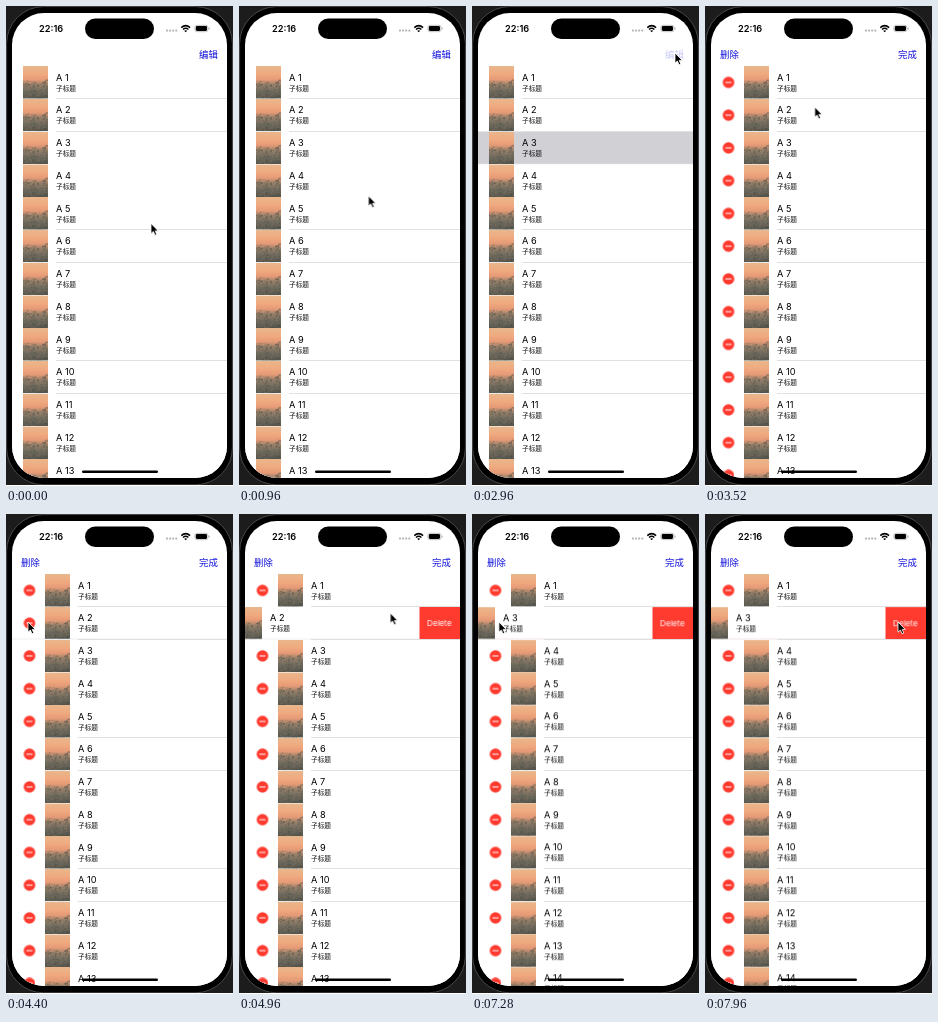
Write an HTML page that moves like this. It is 227x480 px and loops after 8 s.

```html
<!DOCTYPE html>
<html lang="zh">
<head>
<meta charset="utf-8">
<title>List editing</title>
<style>
  html, body { margin: 0; width: 100%; height: 100%; overflow: hidden; background: #1c1c1d; }
  svg { display: block; width: 100vw; height: 100vh; }
  text { font-family: Inter, "Noto Sans CJK SC", "Noto Sans CJK", sans-serif; }
  .bar { font-size: 9.4px; fill: #1010dc; }
  .title { font-size: 9.2px; fill: #000; }
  .sub { font-size: 6.7px; fill: #111; }
  .del { font-size: 8.1px; fill: #fff; }
</style>
</head>
<body>
<svg viewBox="0 0 227 480">
  <defs>
    <linearGradient id="dusk" x1="0" y1="0" x2="0" y2="1">
      <stop offset="0" stop-color="#e9b78c"/>
      <stop offset=".25" stop-color="#f0a97f"/>
      <stop offset=".42" stop-color="#e59a76"/>
      <stop offset=".58" stop-color="#96806a"/>
      <stop offset=".78" stop-color="#6c695d"/>
      <stop offset="1" stop-color="#53544d"/>
    </linearGradient>
    <clipPath id="photoClip"><rect width="25" height="32.8"/></clipPath>
    <clipPath id="screenClip"><rect x="6" y="7" width="215" height="465" rx="32"/></clipPath>
    <g id="photo" clip-path="url(#photoClip)">
      <rect width="25" height="32.8" fill="url(#dusk)"/>
      <g id="trees"/>
    </g>
    <g id="minus">
      <circle r="5.8" fill="#ff3b30"/>
      <rect x="-3" y="-.5" width="6" height="1" fill="#fff"/>
    </g>
  </defs>

  <rect x=".6" y=".6" width="225.8" height="478.2" rx="37" fill="#000" stroke="#48484a" stroke-width="1"/>
  <rect y="479" width="227" height="1" fill="#fff"/>

  <g clip-path="url(#screenClip)">
    <rect x="6" y="7" width="215" height="465" fill="#fff"/>
    <g id="rows"/>
    <g id="lines" fill="#e0e0e2"/>
    <text id="remove" class="bar" x="15" y="51.7">删除</text>
    <text id="edit" class="bar" x="193" y="51.7">编辑</text>
    <text id="done" class="bar" x="193" y="51.7">完成</text>

    <text x="33" y="25.9" font-size="9.2" font-weight="600">22:16</text>
    <g fill="#b4b4b6">
      <rect x="160" y="23.6" width="2" height="2" rx=".7"/>
      <rect x="163.1" y="23.6" width="2" height="2" rx=".7"/>
      <rect x="166.2" y="23.6" width="2" height="2" rx=".7"/>
      <rect x="169.3" y="23.6" width="2" height="2" rx=".7"/>
    </g>
    <g fill="none" stroke="#000" stroke-width="1.5">
      <path d="M175.3 21.6Q179.7 17.6 184.1 21.6"/>
      <path d="M177 23.5Q179.7 21.1 182.4 23.5"/>
    </g>
    <path d="M178.2 24.7Q179.7 23.6 181.2 24.7L179.7 26.3Z"/>
    <rect x="188.9" y="19.3" width="13" height="6.4" rx="2" fill="none" stroke="#999" stroke-width=".6"/>
    <rect x="189.8" y="20.1" width="11.2" height="4.8" rx="1.3"/>
    <rect x="202.6" y="21.4" width=".9" height="2.2" rx=".4" fill="#999"/>
    <rect x="76" y="464.4" width="76" height="2.7" rx="1.35"/>
  </g>
  <rect x="79" y="12.6" width="69" height="20.4" rx="10.2"/>

  <g id="cursor">
    <path d="M0 0V10.2L2.4 8 4 11.8 5.8 11 4.2 7.4H7.3Z" fill="#000" stroke="#fff" stroke-width=".8" stroke-linejoin="round"/>
  </g>
</svg>
<script>
const LOOP = 8000, ROW = 32.75, TOP = 60;
const $ = id => document.getElementById(id);
const EASE = 'cubic-bezier(.25,.1,.25,1)';

// Steps are [ms, value, easing]; the first and last values are held.
function play(el, prop, steps) {
  const frames = steps.map(([ms, value, easing = 'linear']) =>
    ({ offset: ms / LOOP, [prop]: value, easing }));
  frames.unshift({ ...frames[0], offset: 0, easing: 'linear' });
  frames.push({ ...frames[frames.length - 1], offset: 1 });
  el.animate(frames, { duration: LOOP, iterations: Infinity });
}
const move = (el, steps) => play(el, 'transform',
  steps.map(([ms, x, y, easing]) => [ms, `translate(${x}px,${y}px)`, easing]));
const fade = (el, steps) => play(el, 'opacity', steps);

// Fine twigs that rise towards both sides of the photo
let seed = 7;
const rnd = () => (seed = seed * 16807 % 2147483647) / 2147483647;
const tones = ['#55544a', '#6f6656', '#857460', '#4c4e46'];
let trees = '';
for (let i = 0; i < 130; i++) {
  const x = rnd() * 25, y = 17 - Math.abs(x - 13) * .3 + rnd() * 18;
  trees += `<circle cx="${x.toFixed(1)}" cy="${y.toFixed(1)}" r="${(.4 + rnd() * .7).toFixed(1)}" fill="${tones[i % 4]}" opacity=".5"/>`;
}
$('trees').innerHTML = trees;

// Hairlines survive only where they meet the pixel grid: two of every four
for (let i = 1; i < 12; i++) {
  if (i % 4 === 1 || i % 4 === 2) {
    $('lines').innerHTML += `<rect x="50" y="${Math.floor(TOP + i * ROW)}" width="171" height="1"/>`;
  }
}

const EDIT = 3040, EDIT_END = 3340;
const SWIPE = { 2: 4400, 3: 6960 };
const DROP = 5420, DROP_END = 5740;

function row(n) {
  return `<g id="row${n}">
    <rect x="6" width="215" height="33" fill="#fff"/>
    ${n === 3 ? '<rect id="glow" x="6" width="215" height="32.75" fill="#d1d0d5"/>' : ''}
    <g id="cell${n}">
      <use id="minus${n}" href="#minus" x="1.5" y="16.4"/>
      <use href="#photo" x="17"/>
      <text class="title" x="50" y="14.7">A ${n}</text>
      <text class="sub" x="50" y="24.6">子标题</text>
    </g>
    ${SWIPE[n] ? `<g id="delete${n}">
      <rect x="-215" y="32" width="215" height=".75" fill="#e0e0e2"/>
      <rect width="300" height="32.75" fill="#ff3b30"/>
      <text class="del" x="7.6" y="19.2">Delete</text></g>` : ''}
  </g>`;
}

const count = 15;
$('rows').innerHTML = Array.from({ length: count }, (_, i) => row(i + 1)).join('');

for (let n = 1; n <= count; n++) {
  const y = TOP + (n - 1) * ROW;
  move($('row' + n), n > 2
    ? [[DROP, 0, y, EASE], [DROP_END, 0, y - ROW]]
    : [[0, 0, y]]);
  fade($('minus' + n), [[EDIT, 0], [EDIT_END, 1]]);

  const slide = [[EDIT, 0, 0, EASE], [EDIT_END, 22, 0]];
  const at = SWIPE[n];
  if (at) {
    const button = [[at, 221, 0, EASE], [at + 320, 180.5, 0]];
    slide.push([at, 22, 0, EASE], [at + 320, -19, 0]);
    if (n === 2) {
      slide.push([DROP, -19, 0, EASE], [DROP_END, -215, 0]);
      button.push([DROP, 180.5, 0, EASE], [DROP_END, -15, 0]);
    }
    move($('delete' + n), button);
    fade($('delete' + n), [[at, 0, 'step-start'], [at + 1, 1]]);
  }
  move($('cell' + n), slide);
}

fade($('glow'), [[1860, 0, 'step-start'], [1861, 1], [EDIT, 1], [EDIT_END, 0]]);
move($('lines'), [[EDIT, 0, 0, EASE], [EDIT_END, 22, 0]]);
fade($('edit'), [[2880, 1, 'step-start'], [2881, .22], [EDIT, .22], [3160, 0]]);
fade($('done'), [[EDIT, 0], [EDIT_END, 1]]);
fade($('remove'), [[EDIT, 0], [EDIT_END, 1]]);

move($('cursor'), [
  [520, 145, 217.5, 'ease-in-out'],
  [1560, 103, 143],
  [1960, 103, 143, 'ease-in'],
  [2240, 160, 88, 'ease-out'],
  [2520, 218, 43, 'ease-in-out'],
  [2760, 203, 47],
  [3120, 203, 47, 'ease-in'],
  [3520, 110, 101, 'ease-out'],
  [4080, 22, 108],
  [4600, 22, 108, 'ease-in'],
  [4960, 151, 99, 'ease-out'],
  [5220, 193, 108],
  [5960, 193, 108, 'ease-in'],
  [6400, 59.5, 131, 'ease-out'],
  [6760, 22, 108],
  [7200, 22, 108, 'ease-in-out'],
  [7880, 193, 108]
]);
</script>
</body>
</html>
```
